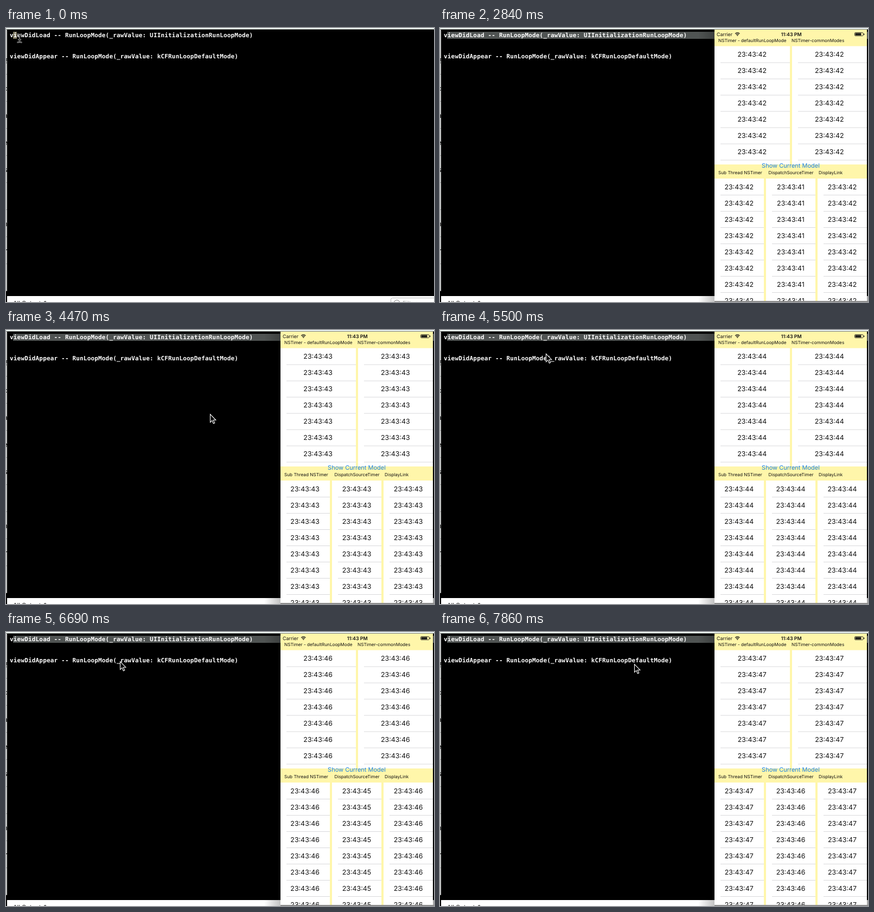
An HTML page that plays this animation: 789 by 506 pixels, repeating every 8 s.

```html
<!DOCTYPE html>
<html lang="en">
<head>
<meta charset="utf-8">
<title>Run loop timers</title>
<style>
  html, body { margin: 0; width: 100%; height: 100%; overflow: hidden; background: #000; }
  svg { display: block; width: 789px; height: 506px; }
  text { font-family: Inter, Roboto, sans-serif; text-rendering: geometricPrecision; white-space: pre; }
  .log text { font: bold 11px "DejaVu Sans Mono", monospace; letter-spacing: .17px; fill: #fff; }
  .edge text { font-size: 13px; text-anchor: end; }
  .label { font-size: 8.2px; fill: #111; }
  .clock { font-size: 12.4px; text-anchor: middle; fill: #111; }
  .line { fill: #d9d9db; }
</style>
</head>
<body>
<svg viewBox="0 0 789 506">
  <defs>
    <clipPath id="phoneClip"><rect x="506" y="3" width="281" height="501"/></clipPath>
    <clipPath id="edgeClip"><rect y="3" width="2" height="483"/></clipPath>
    <linearGradient id="shade">
      <stop offset="0" stop-opacity="0"/>
      <stop offset="1" stop-opacity=".24"/>
    </linearGradient>
  </defs>

  <rect width="789" height="506"/>
  <rect width="789" height="2.5" fill="#eef6f2"/>
  <g class="edge" id="edge" clip-path="url(#edgeClip)">
    <rect y="3" width="2" height="483" fill="#c6c8c7"/>
  </g>

  <rect x="2" y="495" width="787" height="11" fill="#fff"/>
  <text x="13" y="512" font-size="11" fill="#222">All Output ⇕</text>
  <g fill="none" stroke="#b4b4b4">
    <rect x="709.5" y="498.5" width="90" height="20" rx="3"/>
    <circle cx="720.5" cy="508" r="5.5" stroke="#777"/>
  </g>
  <text x="731" y="512" font-size="11" fill="#aaa">Filter</text>

  <rect id="selection" x="13" y="7" height="13"/>
  <g class="log">
    <text x="7" y="17">viewDidLoad -- RunLoopMode(_rawValue: UIInitializationRunLoopMode)</text>
    <text x="7" y="56">viewDidAppear -- RunLoopMode(_rawValue: kCFRunLoopDefaultMode)</text>
  </g>

  <g id="phone">
    <path d="M476 3h30v503h-30z" fill="url(#shade)"/>
    <path d="M506 504h283v2h-283z" fill="#8c8c8c"/>
    <path d="M787 495h2v9h-2z" fill="#aaa"/>
    <g clip-path="url(#phoneClip)">
      <rect x="506" y="3" width="281" height="501" fill="#fff6aa"/>
      <g id="tables"></g>
      <text class="label" x="510" y="15" style="font-size:8.9px">Carrier</text>
      <g fill="none" stroke="#111" stroke-width="1.3">
        <path d="M544.2 10.4q4.1-3.6 8.2 0M545.8 12.2q2.5-2 5 0"/>
      </g>
      <path d="M546.9 13.3q1.4-1.1 2.8 0l-1.4 1.7z" fill="#111"/>
      <text class="label" x="647.7" y="15" text-anchor="middle" style="font-size:8.9px;font-weight:600">11:43 PM</text>
      <rect x="764.5" y="8.5" width="15.5" height="6" rx="1.2" fill="none" stroke="#111" stroke-width=".8"/>
      <path d="M765.5 9.5h11v4h-11zM781 10.3h1.2v2.6h-1.2z" fill="#111"/>
      <text class="label" x="513" y="26">NSTimer - defaultRunLoopMode</text>
      <text class="label" x="648" y="26">NSTimer-commonModes</text>
      <text x="646.5" y="258" text-anchor="middle" font-size="11" fill="#1a82e2">Show Current Model</text>
      <text class="label" x="513" y="270">Sub Thread NSTimer</text>
      <text class="label" x="605.5" y="270">DispatchSourceTimer</text>
      <text class="label" x="698" y="270">DisplayLink</text>
    </g>
  </g>

  <g id="beam" fill="none" stroke-linecap="round">
    <path id="beamShape" d="M-3.5-7.5q3 0 3.5 2.5q.5-2.5 3.5-2.5M0-5V5M-3.5 7.5q3 0 3.5-2.5q.5 2.5 3.5 2.5M-2 2.5h4" stroke="#aaa" stroke-width="2"/>
    <use href="#beamShape" style="stroke:#000"/>
    <path d="M-3.5-7.5q3 0 3.5 2.5q.5-2.5 3.5-2.5M0-5V5M-3.5 7.5q3 0 3.5-2.5q.5 2.5 3.5 2.5M-2 2.5h4" stroke="#111" stroke-width=".8"/>
  </g>
  <path id="arrow" d="M.5.5v14.8l3.3-3.2 2.6 5.6 2.3-1-2.5-5.5h4.6z" fill="#000" stroke="#fff" stroke-width="1.1"/>
</svg>

<script>
const LOOP = 8000, OPEN = 2840, STEP = 147.3, LAG = 150;
const $ = id => document.getElementById(id);

function add(parent, tag, attrs, text = '') {
  const el = document.createElementNS('http://www.w3.org/2000/svg', tag);
  for (const key in attrs) el.setAttribute(key, attrs[key]);
  el.textContent = text;
  parent.append(el);
  return el;
}

// Sliver of the window behind the console
for (let y = 85; y < 486; y += 50) add($('edge'), 'rect', { x: 0, y, width: 2, height: 1, fill: '#999' });
[...'fcaes nr'].forEach((ch, i) => add($('edge'), 'text', { x: 2.5, y: 66 + i * 50 }, ch));

// One table column; returns its clock labels
function column(x, width, top, height, rows, center) {
  const g = $('tables'), clocks = [];
  add(g, 'rect', { x, y: top, width, height, fill: '#fff' });
  for (let i = 0; i < rows; i++) {
    const y = top + i * 30;
    add(g, 'rect', { class: 'line', x: x + 11, y: y + 30, width: width - 11, height: 1 });
    clocks.push(add(g, 'text', { class: 'clock', x: center, y: y + 19.6 }));
  }
  return clocks;
}
const onTime = [
  ...column(506, 139, 33.5, 218.5, 7, 575.2),
  ...column(649, 138, 33.5, 218.5, 7, 717.8),
  ...column(506, 91, 278, 226, 8, 551.2),
  ...column(696, 91, 278, 226, 8, 741.5)
];
const late = column(601, 91, 278, 226, 8, 646.5);

// Linear path through [time, x, y] points
function along(points, t) {
  const i = points.findIndex(p => p[0] > t);
  if (i < 0) return points[points.length - 1].slice(1);
  if (i === 0) return points[0].slice(1);
  const [t0, x0, y0] = points[i - 1], [t1, x1, y1] = points[i];
  const k = (t - t0) / (t1 - t0);
  return [x0 + (x1 - x0) * k, y0 + (y1 - y0) * k];
}
const snap = (t, start) => start + Math.floor((t - start) / STEP) * STEP;

const beamPath = [[0, 25, 19], [150, 34, 24], [300, 44, 29], [603, 44, 29], [750, 90, 64], [1044, 400, 285], [1191, 584, 425]];
const arrowPath = [
  [3584, 452, 488], [3879, 440, 385], [4173, 406, 240], [4468, 376, 155],
  [4615, 336, 110], [4910, 215, 56], [5204, 150, 44], [5352, 172, 40],
  [5499, 195, 43.5], [5646, 145, 50], [5794, 98, 54], [6088, 122, 56],
  [6677, 210, 54], [6972, 256, 58], [7856, 358, 59]
];
const ticks = [3737, 4760, 5788, 6684, 7718];
const clockAt = t => '23:43:' + (42 + ticks.filter(k => t >= k).length);

function show(el, visible) { el.style.display = visible ? '' : 'none'; }
function place(el, [x, y]) { el.setAttribute('transform', `translate(${x.toFixed(1)} ${y.toFixed(1)})`); }
function setClocks(list, value) {
  if (list[0].textContent !== value) list.forEach(el => { el.textContent = value; });
}

function draw(t) {
  const open = t >= OPEN;
  $('selection').setAttribute('width', t < 150 ? 7 : 776);
  $('selection').setAttribute('fill', open ? '#505453' : '#7b765f');
  show($('phone'), open);
  show($('beam'), t < 1338);
  show($('arrow'), t >= 3584);
  place($('beam'), along(beamPath, t < 750 ? Math.floor(t / 150) * 150 : snap(t, 750)));
  place($('arrow'), along(arrowPath, snap(t, 3584) + .01));
  setClocks(onTime, clockAt(t));
  setClocks(late, t < OPEN + LAG ? '23:43:41' : clockAt(t - LAG));
}

const start = performance.now();
function frame() {
  draw((performance.now() - start) % LOOP);
  requestAnimationFrame(frame);
}
frame();
</script>
</body>
</html>
```
